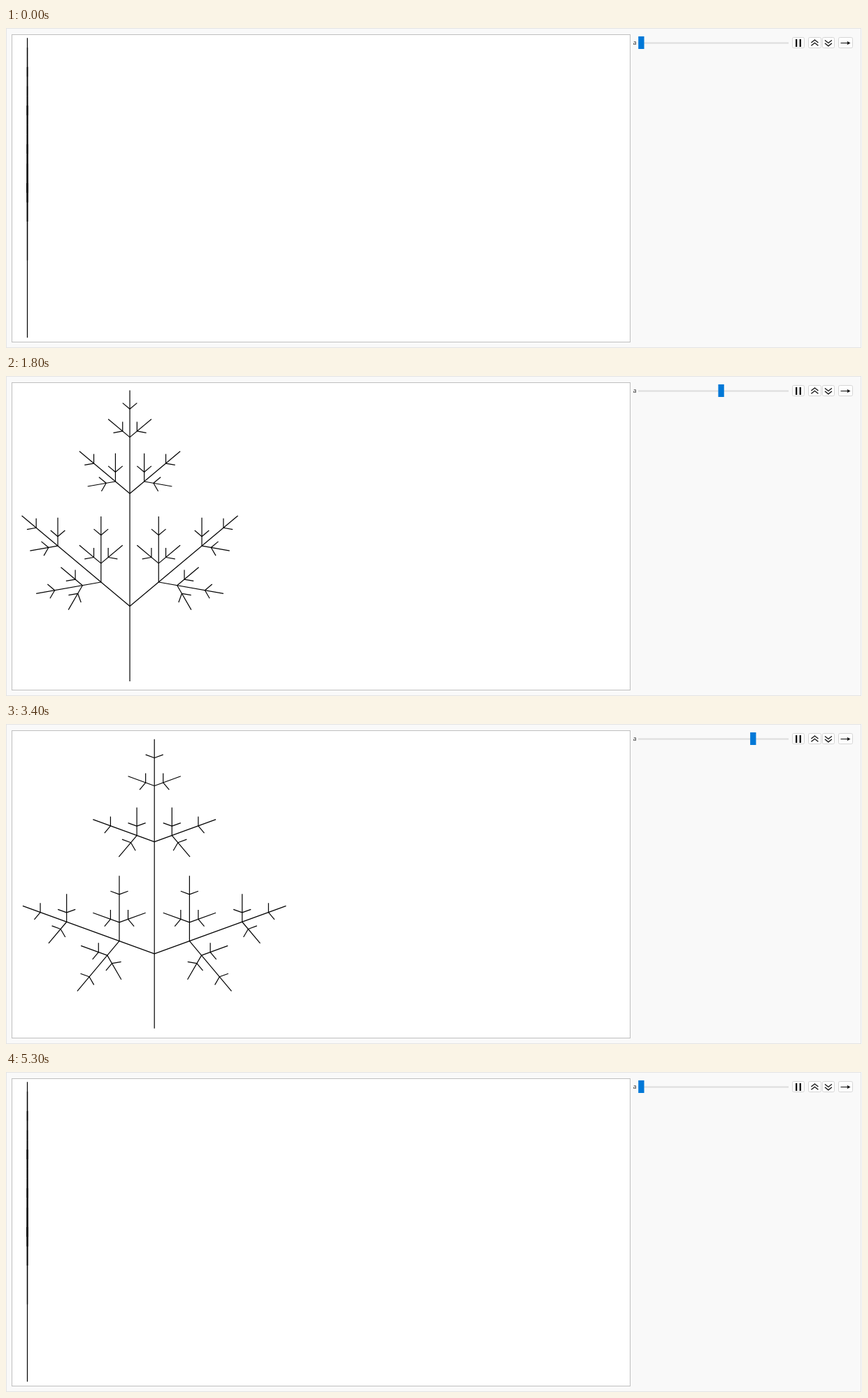
Write an HTML page with a canvas that moves like this. It is 1224 px wide and 458 px high and loops after 6 s.

```html
<!DOCTYPE html>
<html lang="en">
<head>
<meta charset="utf-8">
<title>Branching angle</title>
<style>
  html, body { margin: 0; width: 100%; height: 100%; overflow: hidden; background: #f9f9f9; }
  canvas { display: block; width: 1224px; height: 458px; }
</style>
</head>
<body>
<canvas id="stage" width="1224" height="458"></canvas>
<script>
const ctx = document.getElementById('stage').getContext('2d');

const LOOP = 6000;
const CHANGES = [700, 1000, 1200, 1500, 1800, 2000, 2300, 2600, 2900,
                 3100, 3400, 3700, 4000, 4200, 4500, 4800, 5000, 5300];
const LAST = 9;           // the slider climbs to this step, then returns
const DEPTH = 4;
const RAD = Math.PI / 180;
const VIEW = { left: 16.4, top: 14.2, height: 429.1 };

// X -> F[+X][-X]FX, F -> FF; every axis becomes one line.
function grow(depth, x, y, angle, turn, out) {
  const dx = Math.sin(angle), dy = Math.cos(angle);
  const len = 2 ** (depth + 1) - 1;
  out.push([x, y, x + dx * len, y + dy * len]);
  let at = 0;
  for (let n = depth; n > 0; n--) {
    const part = 2 ** (n - 1);
    at += part;
    for (const side of [-1, 1]) {
      grow(n - 1, x + dx * at, y + dy * at, angle + side * turn, turn, out);
    }
    at += part;
  }
  return out;
}

function line(x1, y1, x2, y2) {
  ctx.beginPath();
  ctx.moveTo(x1, y1);
  ctx.lineTo(x2, y2);
  ctx.stroke();
}

function drawTree(step) {
  const lines = grow(DEPTH, 0, 0, 0, step * 10 * RAD, []);
  const tall = 2 ** (DEPTH + 1) - 1;
  const half = Math.max(...lines.map(l => Math.max(l[0], l[2])));
  const margin = 0.04 * half;
  const marginY = step === LAST ? 0 : margin;
  const unit = VIEW.height / (tall + 2 * marginY);
  const cx = VIEW.left + unit * (step ? half + margin : 1.02);
  const base = VIEW.top + VIEW.height - marginY * unit;

  ctx.strokeStyle = '#000';
  ctx.lineWidth = 1.2;
  for (const [x1, y1, x2, y2] of lines) {
    line(cx + x1 * unit, base - y1 * unit, cx + x2 * unit, base - y2 * unit);
  }
}

function button(x, w) {
  ctx.beginPath();
  ctx.roundRect(x + 0.5, 13.5, w - 1, 15, 2);
  ctx.fillStyle = '#fefefe';
  ctx.fill();
  ctx.strokeStyle = '#d6d6d6';
  ctx.lineWidth = 1;
  ctx.stroke();
}

function chevrons(x, y, rise) {
  ctx.strokeStyle = '#111';
  ctx.lineWidth = 1.3;
  for (const off of [0, 4.3]) {
    ctx.beginPath();
    ctx.moveTo(x - 5, y + off);
    ctx.lineTo(x, y + off + rise);
    ctx.lineTo(x + 5, y + off);
    ctx.stroke();
  }
}

function drawControls(step) {
  ctx.fillStyle = '#222';
  ctx.font = '8.5px "Open Sans", sans-serif';
  ctx.fillText('a', 896.7, 24);

  ctx.fillStyle = '#dcdcdc';
  ctx.fillRect(904, 20.5, 215, 2);
  ctx.fillStyle = '#0078d7';
  ctx.fillRect(904.2 + 22.85 * step, 12, 8.3, 18);

  button(1124, 18);
  ctx.fillStyle = '#111';
  ctx.fillRect(1129, 16, 2.3, 11);
  ctx.fillRect(1134.6, 16, 2.3, 11);

  button(1147, 19);
  chevrons(1156.4, 21, -4);
  button(1167, 18);
  chevrons(1175.9, 17.5, 4);

  button(1190, 21);
  ctx.strokeStyle = '#111';
  line(1193.5, 21.5, 1204, 21.5);
  ctx.fillStyle = '#111';
  ctx.beginPath();
  ctx.moveTo(1207.5, 21.5);
  ctx.lineTo(1202.5, 18.8);
  ctx.lineTo(1203.5, 21.5);
  ctx.lineTo(1202.5, 24.2);
  ctx.fill();
}

function drawPanel() {
  ctx.fillStyle = '#f9f9f9';
  ctx.fillRect(0, 0, 1224, 458);
  ctx.lineWidth = 1;
  ctx.strokeStyle = '#e4e4e4';
  ctx.strokeRect(0.5, 0.5, 1222, 457);
  ctx.fillStyle = '#fff';
  ctx.fillRect(9, 9, 884, 441);
  ctx.strokeStyle = '#bfbfbf';
  ctx.strokeRect(8.5, 9.5, 884, 440);
}

function frame(now) {
  const t = now % LOOP;
  const count = CHANGES.filter(c => c <= t).length;
  const step = LAST - Math.abs(LAST - count);
  drawPanel();
  drawTree(step);
  drawControls(step);
  requestAnimationFrame(frame);
}

frame(0);
</script>
</body>
</html>
```
